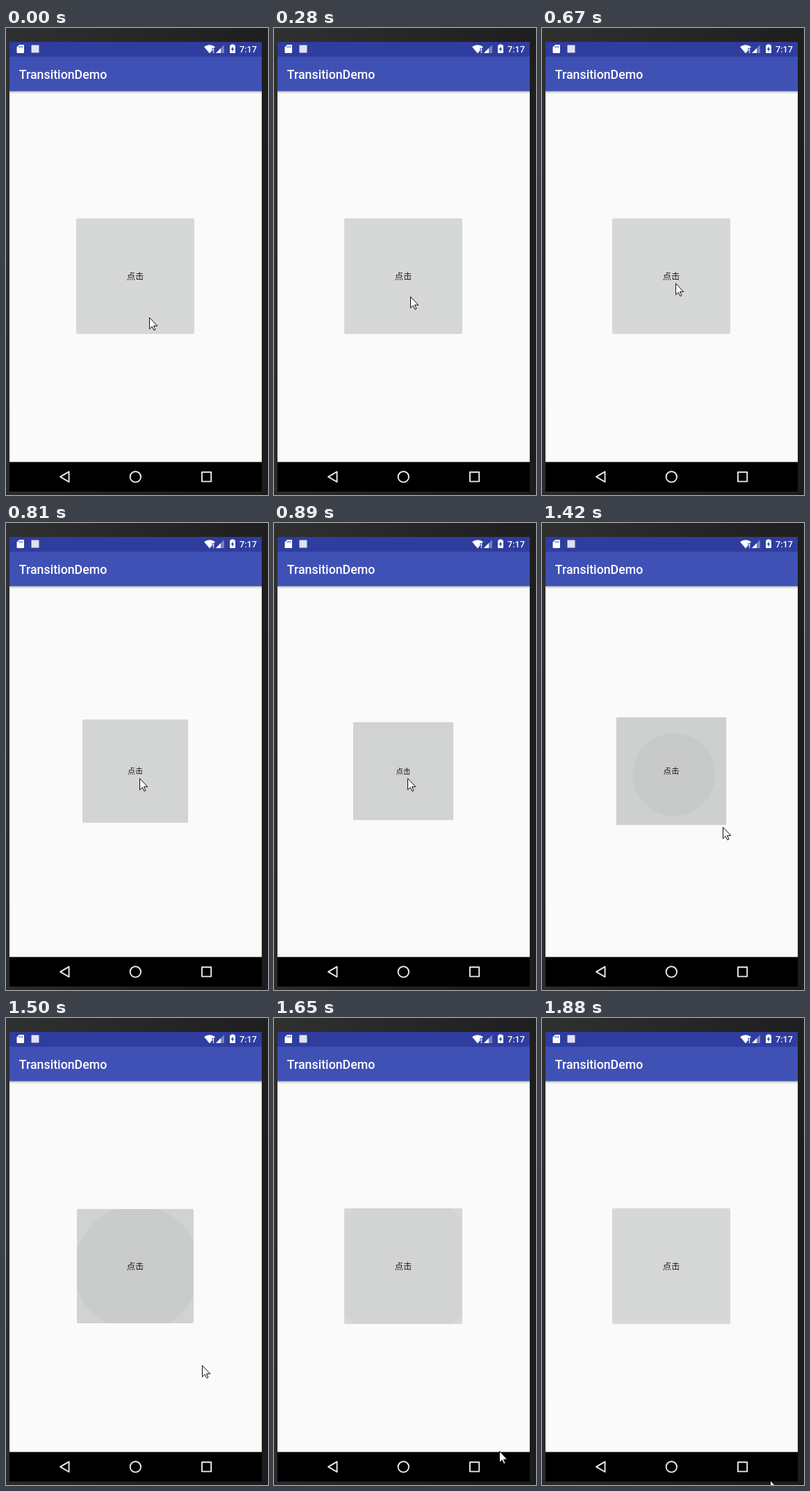
Write an HTML page that moves like this. It is 377 by 670 pixels and loops after 1.96 s.

```html
<!DOCTYPE html>
<html lang="zh-CN">
<head>
<meta charset="utf-8">
<title>TransitionDemo</title>
<style>
  html, body { margin: 0; width: 100%; height: 100%; overflow: hidden; background: #222; }
  svg { display: block; width: 100%; height: 100%; }
  text { font-family: Roboto, sans-serif; font-weight: 500; fill: #fff; }
  .label { font: 400 12.36px "Noto Sans CJK SC", "Noto Sans CJK", sans-serif; fill: #1b1b1e; text-anchor: middle; }
  .nav { fill: none; stroke: #ececec; stroke-width: 1.9; stroke-linejoin: round; }
</style>
</head>
<body>
<svg viewBox="0 0 377 670">
  <defs>
    <linearGradient id="desk" x1="0" y1="0" x2="1" y2="0.3">
      <stop offset="0" stop-color="#303030"/>
      <stop offset="1" stop-color="#1d1d1d"/>
    </linearGradient>
    <linearGradient id="shade" x1="0" y1="0" x2="0" y2="1">
      <stop offset="0" stop-color="#000" stop-opacity=".27"/>
      <stop offset="1" stop-color="#000" stop-opacity="0"/>
    </linearGradient>
    <clipPath id="face"><rect x="-85" y="-83" width="170" height="166" rx="2"/></clipPath>
  </defs>

  <rect width="377" height="670" fill="url(#desk)"/>
  <rect x="5" y="20" width="363" height="645" fill="#fafafa"/>
  <rect x="5" y="90" width="363" height="4.5" fill="url(#shade)"/>
  <rect x="5" y="41" width="363" height="49.6" fill="#4051b5"/>
  <rect x="5" y="20" width="363" height="21.2" fill="#2e3d9e"/>
  <text x="18.8" y="72.6" font-size="17.75">TransitionDemo</text>

  <!-- status bar -->
  <g fill="#fff">
    <path d="M19 24H25Q26 24 26 25V35Q26 36 25 36H16.5Q15.5 36 15.5 35V27.5Z"/>
    <path d="M19 26v2.3M21.3 26v2.3M23.6 26v2.3" stroke="#2e3d9e"/>
    <rect x="36.5" y="24.5" width="11" height="11" fill="#dfe2f1"/>
    <path d="M285 27Q293 21.500 301 27L299.5 28.8H296.5V32.3L293 36.5Z"/>
    <path d="M297.6 29.5h1.6v4h-1.6zM297.6 34.5h1.6v1.6h-1.6z"/>
    <path d="M314 24V36H302Z" opacity=".35"/>
    <path d="M309 29V36H302Z"/>
    <path d="M324 24.5V23.5H328V24.5H329Q330 24.5 330 25.5V35.2Q330 36 329 36H323Q322 36 322 35.2V25.5Q322 24.5 323 24.5Z"/>
    <path d="M326.5 26.3L323.8 31H325.5V34.3L328.2 29.5H326.5Z" fill="#2e3d9e"/>
  </g>
  <text x="336" y="35.2" font-size="12.7">7:17</text>

  <!-- navigation bar -->
  <rect x="5" y="622.65" width="363" height="42.35" fill="#000"/>
  <g class="nav" transform="translate(.3 .3)">
    <path d="M77.8 643.6L90.3 636.300V650.9Z"/>
    <circle cx="186" cy="643.6" r="7.7"/>
    <rect x="281.6" y="637" width="13.3" height="13.3"/>
  </g>

  <g id="button">
    <g clip-path="url(#face)">
      <rect x="-85" y="-83" width="170" height="166" fill="#d6d7d7"/>
      <rect id="press" x="-85" y="-83" width="170" height="166"/>
      <circle id="ripple"/>
    </g>
    <text class="label" y="4.8">点击</text>
  </g>

  <path id="cursor" d="M.5 .5V16.8L4.2 13.3L6.8 18.7L9 17.7L6.5 12.4H11.7Z"
        fill="#fff" stroke="#0a0a14" stroke-linejoin="round"/>
</svg>
<script>
  const LOOP = 1960, FIRST = 43, STEP = 76.25;
  const DOWN = 660, UP = 1270;

  const [button, press, ripple, cursor] =
    ["button", "press", "ripple", "cursor"].map(id => document.getElementById(id));

  const set = (el, attrs) => {
    for (const name in attrs) el.setAttribute(name, attrs[name]);
  };
  const clamp = v => Math.min(1, Math.max(0, v));
  const ramp = (t, from, span) => clamp((t - from) / span);
  const smooth = v => (1 - Math.cos(Math.PI * v)) / 2;
  const easeOut = v => 1 - (1 - v) ** 2;

  const snap = t => t < FIRST ? 0 : FIRST + STEP * Math.floor((t - FIRST) / STEP);

  // strokes of the pointer: progress, dx, dy
  function pointer(t) {
    const strokes = [
      [ramp(t, 0, FIRST), -5, -11],
      [ramp(t, 196, 150), -9, -38],
      [ramp(t, 1190, 70), -2, -4],
      [ramp(t, 1265, 150), 70, 74],
      [ramp(t, 1415, 225), 64, 183],
      [easeOut(ramp(t, 1640, 230)), 4, 44]
    ];
    return strokes.reduce(([x, y], [p, dx, dy]) => [x + p * dx, y + p * dy], [206, 415]);
  }

  function draw(time) {
    const t = snap(time);
    const [x, y] = pointer(t).map(Math.round);
    set(cursor, { transform: `translate(${x} ${y})` });

    const scale = 1 - 0.15 * (smooth(ramp(t, DOWN, 230)) - smooth(ramp(t, UP, 270)));
    set(button, { transform: `translate(186 356) scale(${scale})` });

    set(press, { opacity: 0.061 * (ramp(t, DOWN, 600) - ramp(t, UP, 380)) });

    // the ripple drifts from the touch point to the centre while it grows
    const drift = 1 - ramp(t, 1420, 230);
    set(ripple, {
      cx: 4 * drift / scale,
      cy: 5 * drift / scale,
      r: 108 * ramp(t, UP, 264) / scale,
      opacity: 0.03 * (1 - ramp(t, 1600, 110))
    });
  }

  const start = performance.now();
  function frame() {
    draw((performance.now() - start) % LOOP);
    requestAnimationFrame(frame);
  }
  frame();
</script>
</body>
</html>
```
